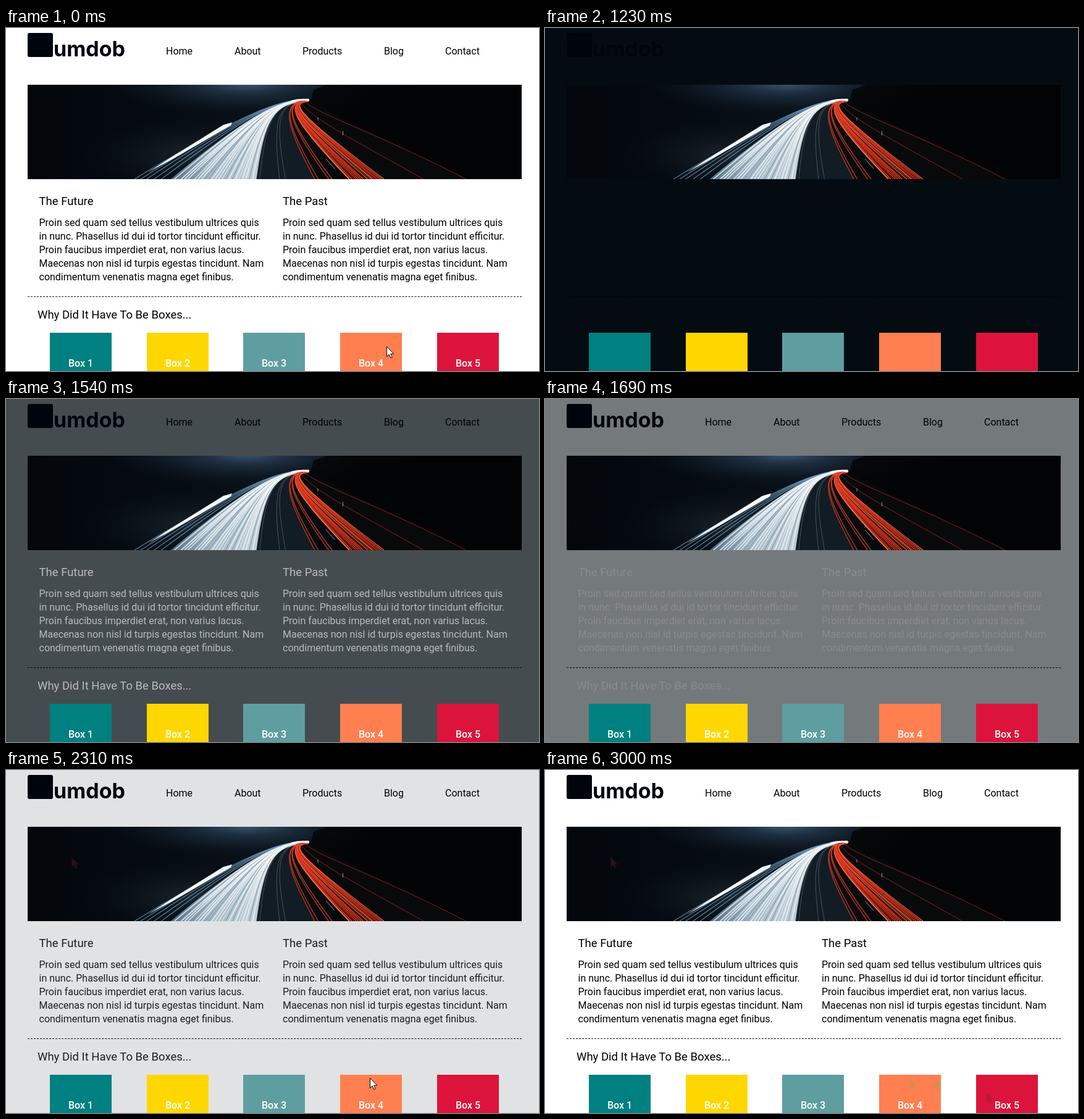
An HTML page for the animation above (3080 ms loop, 863 px wide and 556 px high).

```html
<!DOCTYPE html>
<html lang="en">
<head>
<meta charset="utf-8">
<title>Page fade-in</title>
<style>
  html, body { margin: 0; width: 100%; height: 100%; overflow: hidden; background: #fff; }
  svg { display: block; width: 863px; height: 556px; }
  text { font: 16px Roboto, sans-serif; }
  .title { font-size: 18.5px; }
  .label { font-weight: 500; }
  .brand { font: 700 34px Inter, sans-serif; }
</style>
</head>
<body>
<svg id="stage" viewBox="0 0 863 556" xmlns="http://www.w3.org/2000/svg">
  <defs>
    <linearGradient id="night">
      <stop offset="0" stop-color="#03070c"/><stop offset=".3" stop-color="#060c13"/>
      <stop offset=".5" stop-color="#0a121a"/><stop offset=".68" stop-color="#040506"/>
      <stop offset=".85" stop-color="#000"/>
    </linearGradient>
    <radialGradient id="sky">
      <stop offset="0" stop-color="#3a5673"/><stop offset=".3" stop-color="#213447" stop-opacity=".85"/>
      <stop offset=".65" stop-color="#131f2b" stop-opacity=".6"/>
      <stop offset="1" stop-color="#0a121c" stop-opacity="0"/>
    </radialGradient>
    <radialGradient id="verge">
      <stop offset="0" stop-color="#1c262e"/><stop offset="1" stop-color="#0a1118" stop-opacity="0"/>
    </radialGradient>
    <linearGradient id="glow" gradientUnits="userSpaceOnUse" x1="270" y1="0" x2="420" y2="0">
      <stop offset="0" stop-color="#54728a"/><stop offset=".4" stop-color="#a3b9c7"/>
      <stop offset="1" stop-color="#c3d0d8"/>
    </linearGradient>
    <clipPath id="frame"><rect x="35" y="92" width="800" height="153"/></clipPath>
    <path id="arrow" d="M.5 .5V16.6L4.2 13.1L6.7 18.8L9.2 17.7L6.7 12.2H11.8Z"/>
  </defs>
  <rect id="backdrop" width="863" height="556"/>
  <g fill="#00040c">
    <rect x="35" y="8" width="41" height="39" rx="3"/>
    <text class="brand" x="77" y="46">umdob</text>
  </g>
  <g id="photo" clip-path="url(#frame)">
    <rect x="35" y="92" width="800" height="153" fill="url(#night)"/>
    <ellipse cx="390" cy="90" rx="230" ry="52" fill="url(#sky)"/>
    <ellipse cx="310" cy="205" rx="190" ry="60" fill="url(#verge)"/>
    <path d="M492 122L498 100L520 92H835V245H745Z" fill="#030405" opacity=".8"/>
    <path d="M490 117C432 118 418 150 405 245H500C455 160 440 120 490 117" fill="#121c25"/>
    <path d="M490 117C455 120 480 145 612 245H745L495 122Z" fill="#08090b"/>
    <path d="M490 115C438 117 391 143 267 245H405C418 150 432 118 490 119Z" fill="url(#glow)"/>
  </g>
  <path d="M35 435.5H835" stroke="#000" stroke-dasharray="3 2.0126"/>
  <g id="boxes"></g>
  <g id="copy">
    <g id="nav"></g>
    <g id="prose"></g>
    <g id="labels" fill="#fff" text-anchor="middle"></g>
  </g>
  <g id="traces"></g>
  <use id="cursor" href="#arrow" fill="#fff" stroke="#000"/>
</svg>
<script>
const LOOP = 3080, STEP = 77, RELOAD = 16;
const $ = id => document.getElementById(id);

function add(parent, tag, attrs, content = '') {
  const node = document.createElementNS('http://www.w3.org/2000/svg', tag);
  for (const key in attrs) node.setAttribute(key, attrs[key]);
  node.textContent = content;
  $(parent).append(node);
  return node;
}

const mix = (a, b, k) => a + (b - a) * k;

let seed = 11;
const random = () => (seed = seed * 16807 % 2147483647) / 2147483647;

// Light trails interpolate between a leftmost and a rightmost curve.
function trail(left, right, k, stroke, width, opacity) {
  const [x0, y0, x1, y1, x2, y2, x3, y3] = left.map((v, i) => mix(v, right[i], k));
  add('photo', 'path', {
    d: `M${x0} ${y0}C${x1} ${y1} ${x2} ${y2} ${x3} ${y3}`,
    fill: 'none', stroke, 'stroke-width': width, opacity
  });
}

function drawTrails() {
  const headLeft = [490, 115, 440, 116, 380, 140, 208, 245];
  const headRight = [490, 119, 432, 118, 418, 150, 405, 245];
  const tailLeft = [490, 116, 440, 120, 455, 160, 500, 245];
  const tailRight = [490, 119, 455, 120, 480, 145, 612, 245];

  for (const k of [0, .05, .1, .16, .22]) trail(headLeft, headRight, k, '#6f9cc0', 1.3, .75);
  for (let i = 0; i < 26; i++) {
    const k = .3 + .7 * i / 25;
    const dim = random() < .22;
    trail(headLeft, headRight, k, dim ? '#55738a' : '#fbfdfe', dim ? 1 : 1 + random() * 1.8, dim ? .6 : .9 - k * .35);
  }
  add('photo', 'path', { d: 'M366 153L352 157L262 213L230 234L274 210L364 158Z', fill: '#f4f8fb' });
  for (const k of [.06, .4, .5]) trail(headRight, tailLeft, k, '#7d8d99', .8, .6);

  for (const k of [0, .05, .2, .25]) trail(tailLeft, tailRight, k, '#e8401f', 1.3, .85);
  for (let i = 0; i < 16; i++) {
    const stroke = random() < .2 ? '#ff7648' : random() < .3 ? '#8c1c10' : '#ee3a20';
    trail(tailLeft, tailRight, .5 + i / 30, stroke, .9 + random() * 1.3, .75 + random() * .25);
  }
  const side = { fill: 'none', stroke: '#b52a18', opacity: .75 };
  add('photo', 'path', { ...side, d: 'M484 119C500 138 600 170 745 245' });
  add('photo', 'path', { ...side, d: 'M478 122C500 150 570 185 676 245' });
  add('photo', 'path', { d: 'M505 145v5M545.5 167v7M518 212l14 16', stroke: '#bcc3c8', opacity: .75 });
  add('photo', 'path', { d: 'M462 119Q475 115 491 117', fill: 'none', stroke: '#fff', 'stroke-width': 3 });
}

function drawPage() {
  const menu = { Home: 259, About: 370, Products: 480, Blog: 612, Contact: 711 };
  for (const name in menu) add('nav', 'text', { x: menu[name], y: 43 }, name);

  const lines = [
    'Proin sed quam sed tellus vestibulum ultrices quis',
    'in nunc. Phasellus id dui id tortor tincidunt efficitur.',
    'Proin faucibus imperdiet erat, non varius lacus.',
    'Maecenas non nisl id turpis egestas tincidunt. Nam',
    'condimentum venenatis magna eget finibus.'
  ];
  [['The Future', 53.5], ['The Past', 448]].forEach(([title, x]) => {
    add('prose', 'text', { class: 'title', x, y: 287 }, title);
    lines.forEach((line, i) => add('prose', 'text', { x, y: 321 + 22 * i }, line));
  });
  add('prose', 'text', { class: 'title', x: 51, y: 471 }, 'Why Did It Have To Be Boxes...');

  ['#008080', '#ffd700', '#5f9ea0', '#ff7f50', '#dc143c'].forEach((fill, i) => {
    const x = Math.round(71 + 156.7 * i);
    add('boxes', 'rect', { x, y: 494, width: 100, height: 62, fill });
    add('labels', 'text', { class: 'label', x: x + 50, y: 549 }, `Box ${i + 1}`);
  });
}

// Standard "ease" timing curve, solved by bisection.
function ease(x) {
  if (x <= 0 || x >= 1) return x <= 0 ? 0 : 1;
  const bezier = (a, b, t) => 3 * a * t * (1 - t) ** 2 + 3 * b * t * t * (1 - t) + t ** 3;
  let low = 0, high = 1;
  for (let i = 0; i < 24; i++) {
    const mid = (low + high) / 2;
    if (bezier(.25, .25, mid) < x) low = mid; else high = mid;
  }
  return bezier(.1, 1, low);
}

const blend = (from, to, k) => `rgb(${from.map((v, i) => Math.round(mix(v, to[i], k)))})`;

const pointer = {
  0: [616, 516], 1: [35, 169], 29: [106, 141],
  30: [589, 499], 31: [630, 500], 32: [714, 522]
};

drawTrails();
drawPage();

// Faint marks the pointer leaves where it passed.
const traces = [[29, '#2a1218'], [30, '#d98c4c'], [31, '#d98c4c'], [32, '#b81a2e']].map(([step, fill]) => ({
  step,
  node: add('traces', 'use', { href: '#arrow', fill, transform: `translate(${pointer[step]})` })
}));

function render(time) {
  const step = Math.min(39, Math.floor((time % LOOP + 9) / STEP));
  const fade = step < RELOAD ? 1 : ease((step * STEP - 1182) / 1890);
  $('backdrop').setAttribute('fill', blend([0, 9, 15], [255, 255, 255], fade));
  $('prose').setAttribute('fill', blend([255, 255, 255], [0, 0, 0], fade));
  $('copy').style.display = step === RELOAD ? 'none' : '';

  const spot = pointer[step];
  $('cursor').style.display = spot ? '' : 'none';
  if (spot) $('cursor').setAttribute('transform', `translate(${spot})`);
  for (const trace of traces) trace.node.style.display = step > trace.step ? '' : 'none';
}

function tick() {
  render(performance.now());
  requestAnimationFrame(tick);
}
tick();
</script>
</body>
</html>
```
